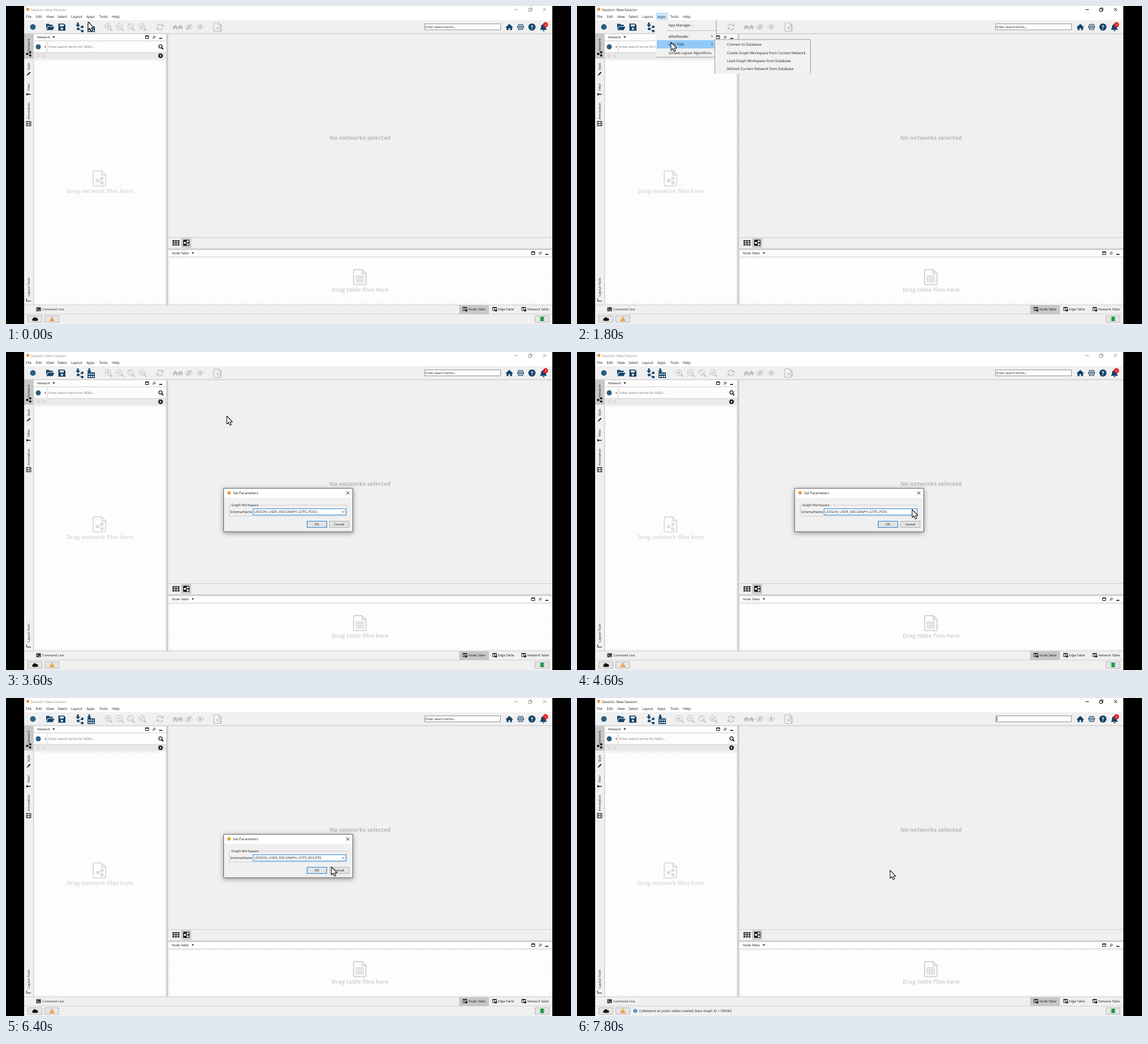
Write an HTML page that moves like this. It is 998 px wide and 561 px high and loops after 8000 ms.

```html
<!DOCTYPE html>
<html lang="en">
<head>
<meta charset="utf-8">
<title>Session</title>
<style>
html, body { margin: 0; height: 100%; overflow: hidden; background: #000; }
svg { display: block; width: 100vw; height: 100vh; }
text { font: 6.25px "Open Sans", "Noto Sans", sans-serif; fill: #1c1c1c; text-rendering: geometricPrecision; white-space: pre; }
.small text, text.small { font-size: 5.65px; }
.mid { text-anchor: middle; }
.big { font-size: 10px; font-weight: 700; text-anchor: middle; }
.pale { fill: #dcdcdc; }
.hint { fill: #777; }
.caption { fill: #8c8c8c; stroke: #999; }
.caption text { stroke: none; fill: inherit; }
.caption.active { fill: #1c1c1c; stroke: #111; }
.line { fill: none; stroke-width: 1; }
.blue { fill: #124368; stroke: #124368; }
.grey { stroke: #bdbdbd; fill: #bdbdbd; }
.blue .line, .grey .line { fill: none; }
.blue, .grey { stroke-width: 0; }
.blue .line, .grey .line { stroke-width: 1.3; }
#dialog { filter: drop-shadow(0 2px 4px #0006); }
</style>
</head>
<body>
<svg viewBox="0 0 998 561" preserveAspectRatio="none">
<defs>
  <g id="lens" class="line"><circle cx="-1" cy="-1" r="5"/><path d="M2.8 2.8L6.5 6.5" style="stroke-width:2"/></g>
  <path id="page" class="line" d="M-9-13H4L11-6V11Q11 13.500 9 13.500H-9Q-11 13.500-11 11V-11Q-11-13-9-13ZM4-13V-6H11" style="stroke-width:2"/>
  <g id="share"><path class="line" d="M4-4L-4 0L4 4" /><circle cx="-4" r="2.400"/><circle cx="4" cy="-4" r="2.400"/><circle cx="4" cy="4" r="2.400"/></g>
  <path id="house" d="M-6.500 .5L0-5.500L6.500 .5L5.800 1.400L4.800 .6V5.500H1.300V2H-1.300V5.500H-4.800V.6L-5.800 1.400Z"/>
  <g id="eye"><path class="line" d="M-6.500 0Q0-8 6.500 0Q0 8-6.500 0Z"/><circle r="2.200"/></g>
  <g id="paneTools">
    <path class="line" stroke="#111" d="M246.500 52.500h5.500v5h-5.500zM246.500 53.300h5.500"/>
    <path class="line" stroke="#333" stroke-width=".8" d="M259 57.800l2-2M259.500 54l3 3M260.500 54.500l1.700-2l2 2l-2 1.700"/>
    <path stroke="#111" stroke-width="1.600" d="M270.500 57.200h5.500"/>
  </g>
  <g id="tableMark"><path d="M-4-3.500h7v6h-7z" fill="none" stroke="#333"/><path d="M-4-2.500h7M-1-3v5" stroke="#333"/><circle cx="2" cy="2" r="2" fill="#222"/></g>
</defs>

<!-- window surfaces -->
<path fill="#f0f0f1" d="M32 0H965V561H32Z"/>
<path fill="#fff" d="M32 0H965V25H32Z"/>
<path fill="#c7c7c7" d="M32 49H48V93H32Z"/>
<path fill="#fdfdfd" d="M48 49H283V82H48ZM48 94H283V527H48ZM287 430H965V527H287Z"/>
<path fill="#e9e9ea" d="M48 82H283V94H48Z"/>
<path fill="#cfcfd0" d="M283 49H286.500V527H283ZM286 427.500H965V430.500H286ZM32 48H965V49.500H32Z"/>
<path class="line" stroke="#cfcfcf" d="M48 61.500H283M48 82H283M72.500 63V81M287 408.500H965M287 442.500H965M32 527.500H965M32 543.500H965M48.500 49V527"/>
<path class="line" stroke="#d4d4d4" stroke-dasharray="2 2" d="M49.500 95.500H281.500V525.500H49.500ZM288.500 444.500H963.500V525.500H288.500Z"/>

<!-- title and menu bar -->
<circle cx="38.500" cy="6" r="2.800" fill="#e89a3c"/>
<g id="caption" class="caption">
  <text x="44" y="8.700">Session: New Session</text>
  <path class="line" d="M898 6.500h6M923 5h4.500v4.500h-4.500zM924.500 5v-1.500h4.500v4.500h-1.500M948.500 3.500l5.500 5.500M954 3.500l-5.500 5.500"/>
</g>
<path id="appsHover" fill="#cce8ff" stroke="#99d1ff" stroke-width=".8" d="M140.500 12.500H160V24H140.500Z"/>
<g><text x="35" y="21">File</text><text x="52.500" y="21">Edit</text><text x="71" y="21">View</text><text x="91" y="21">Select</text><text x="115" y="21">Layout</text><text x="142" y="21">Apps</text><text x="164.500" y="21">Tools</text><text x="187" y="21">Help</text></g>

<!-- toolbar -->
<circle cx="47.500" cy="37" r="5" fill="#2c5f80"/>
<g class="blue">
  <path d="M71 31.500h5l1.500 1.500h5v2.500h-8.500l-3 5zM74.500 36.500h11l-3 6h-11z"/>
  <path fill-rule="evenodd" d="M92.500 31h10l2.500 2.500v10h-12.500zM95 32.500v3.500h7v-3.500zM98.700 38a2 2 0 1 0 .1 0z"/>
  <path d="M125.500 29h3v4h2.500l-4 4.500l-4-4.500h2.500zM145.500 29h3v4h2.500l-4 4.500l-4-4.500h2.500z"/>
  <g transform="translate(131 40.500) scale(.95)"><use href="#share"/></g>
  <path fill-rule="evenodd" d="M144 36h13v10h-13zM145.500 38v2h2.500v-2zM149.200 38v2h2.600v-2zM153 38v2h2.500v-2zM145.500 42v2.500h2.500v-2.500zM149.200 42v2.500h2.600v-2.500zM153 42v2.500h2.500v-2.500z"/>
  <use href="#house" x="889" y="37"/>
  <circle cx="909" cy="37" r="6"/><circle cx="929" cy="37" r="6.300"/>
  <path d="M943 42q2-2 2-5q0-4.500 4.500-5q4 .5 4 5q0 3 2 5zM947.500 42.700h4a2 1.700 0 0 1-4 0z"/>
</g>
<path class="line" stroke="#f0f0f1" stroke-width=".8" d="M903 35h12M903 39h12M909 31v12"/>
<ellipse class="line" stroke="#f0f0f1" cx="909" cy="37" rx="3" ry="6"/>
<text class="mid" x="929" y="40.500" style="font-size:9.500px;font-weight:700;fill:#fff">?</text>
<circle cx="953" cy="33" r="4.500" fill="#e02020"/>
<text class="mid" x="953" y="35" style="font-size:5.500px;fill:#fff">3</text>
<g class="grey">
  <use href="#lens" x="181" y="37"/><use href="#lens" x="201" y="37"/><use href="#lens" x="221" y="37"/><use href="#lens" x="241" y="37"/>
  <path class="line" d="M177.500 36h5M180 33.500v5M197.500 36h5M218 35v-1.500h1.500M222 37v1.500h-1.500M237.500 36l2 2l3-4"/>
  <path class="line" d="M267 35.500q1.500-3.500 5-3.500q3 0 4.500 2.500M277 38.500q-1.500 3.500-5 3.500q-3 0-4.500-2.500"/><path d="M278 31.500v4.500h-4.500zM266 42.500v-4.500h4.500z"/>
  <use href="#house" transform="translate(299 37) scale(.75)"/><use href="#house" transform="translate(308 37) scale(.75)"/>
  <use href="#eye" x="323" y="37"/><path class="line" d="M318 42l10-10"/>
  <use href="#eye" x="343" y="37"/>
  <g transform="translate(373.500 37) scale(.58)"><use href="#page"/></g><g transform="translate(376.500 39) scale(.7)"><use href="#share"/></g>
</g>
<path fill="#fff" stroke="#777" stroke-width=".8" d="M739.500 31.500H873.500V42H739.500Z"/>
<text id="searchHint" class="small" x="741" y="39">Enter search terms...</text>
<path id="caret" stroke="#111" d="M741.700 33v7.500"/>

<!-- side panel -->
<g class="small">
  <text x="55" y="57.200">Network</text><text x="293" y="438.200">Node Table</text>
  <text transform="translate(42 80)rotate(-90)">Network</text>
  <text transform="translate(42 113)rotate(-90)">Style</text>
  <text transform="translate(42 149.500)rotate(-90)">Filter</text>
  <text transform="translate(42 200)rotate(-90)">Annotation</text>
  <text transform="translate(42 512)rotate(-90)">Layout Tools</text>
</g>
<path fill="#222" d="M82 53.500h4.500l-2.200 3zM328 434.500h4l-2 3zM36 154.500v-1l3.500 1.500h4v1.500h-4l-3.500 1.500zM36.500 123.500l1.500-3.500l4-4l1.500 1.500l-4 4z"/>
<g transform="translate(40 84.500) scale(.7)" fill="#111" stroke="#111"><use href="#share"/></g>
<path class="line" stroke="#222" d="M36 203.500h8v8h-8zM38 203.500v8M42 203.500v8M38 207.500h4M36.500 516v4.500h7.500"/>
<use href="#paneTools"/><use href="#paneTools" x="682" y="381"/>
<circle cx="57" cy="72" r="4.500" fill="#2c5f80"/>
<path fill="#222" d="M68 71.500h3l-1.500 2z"/>
<text class="hint" x="75" y="74.200" style="font-size:5.850px">Enter search terms for NDEx...</text>
<g transform="translate(273.500 72) scale(.65)" stroke="#111" style="stroke-width:2"><circle cx="-1" cy="-1" r="4.500" fill="none" stroke-width="2"/><path d="M2.500 2.500L6.500 6.500" stroke-width="3"/></g>
<circle cx="273" cy="87.700" r="2.500" fill="none" stroke="#111" stroke-width="2"/><circle cx="273" cy="87.700" r="3.900" fill="none" stroke="#111" stroke-width="1.200" stroke-dasharray="1.530"/>
<path class="line" stroke="#c2c2c2" d="M54 85l2.500 2l2.500-2M54 88l2.500 2l2.500-2M64 87l2.500-2l2.500 2M64 90l2.500-2l2.500 2"/>
<g class="pale" stroke="#dcdcdc"><use href="#page" x="165" y="304"/><g transform="translate(165.500 308)" stroke-width="1.300"><use href="#share"/></g></g>
<text class="big pale" x="165.500" y="329.500">Drag network files here</text>

<!-- network view and tables -->
<text class="big" x="625.500" y="235.500" style="fill:#bababa">No networks selected</text>
<path fill="#c7c7c7" d="M309.500 409.500H327V426.500H309.500Z"/>
<path fill="#222" d="M294 413h3.500v2.500h-3.500zM298.500 413h3.500v2.500h-3.500zM303 413h3.500v2.500h-3.500zM294 416.500h3.500v2.500h-3.500zM298.500 416.500h3.500v2.500h-3.500zM303 416.500h3.500v2.500h-3.500zM294 420h3.500v2.500h-3.500zM298.500 420h3.500v2.500h-3.500zM303 420h3.500v2.500h-3.500z"/>
<rect x="313" y="412.500" width="11" height="10.500" rx="1.500" fill="#111"/>
<g transform="translate(318.500 417.800) scale(.65)" fill="#fff" stroke="#fff"><use href="#share"/></g>
<g stroke="#d4d4d4"><use href="#page" x="625" y="478"/><path class="line" style="stroke-width:1.300" d="M618.500 476h13v11h-13zM618.500 479.500h13M618.500 483.500h13M623 476v11M627.500 476v11"/></g>
<text class="big" x="625.500" y="504" style="fill:#d4d4d4">Drag table files here</text>

<!-- bottom tabs and status bar -->
<path fill="#c7c7c7" d="M800.500 528H853V543H800.500Z"/>
<rect x="53.500" y="531.500" width="8" height="7" fill="#333"/><path class="line" stroke="#fff" stroke-width=".8" d="M55 533.500l1.500 1.500l-1.500 1.500M57.500 537h2.500"/>
<use href="#tableMark" x="811" y="535"/><use href="#tableMark" x="863.500" y="535"/><use href="#tableMark" x="915" y="535"/>
<g class="small"><text x="64" y="537" style="font-size:5.400px">Command Line</text><text x="817" y="537">Node Table</text><text x="869" y="537">Edge Table</text><text x="921" y="537">Network Table</text></g>
<path fill="#e5e5e5" stroke="#aaa" stroke-width=".8" d="M38.500 546.500H63.500V558H38.500ZM68.500 546.500H93.500V558H68.500ZM934.500 546.500H959V558H934.500Z"/>
<path fill="#111" d="M48 555.500a2.300 2.300 0 0 1 0-4.500a3 3 0 0 1 5.500-.5a2.500 2.500 0 0 1 1 5z"/>
<path fill="#ee9124" d="M81 547.500l4.500 8.500h-9z"/><path stroke="#fff" d="M81 550.500v2.500M81 554v1"/>
<path fill="#159a43" d="M944.500 548h5v8h-5z"/><path class="line" stroke="#159a43" d="M943 549.500h8M943 552h8M943 554.500h8"/>
<g id="message"><circle cx="103" cy="552" r="3.300" fill="#2f86c5"/><path stroke="#fff" d="M103 549.800v1M103 551.500v2.500"/><text x="110" y="554.200" style="font-size:5.800px">CyNetwork w/ public tables created: Base Graph ID = 305683</text></g>

<!-- menus -->
<g id="menu">
  <path fill="#f1f1f1" d="M139.500 25H246V90H139.500Z"/><path class="line" stroke="#9a9a9a" d="M139.500 90.200H246V25"/>
  <path stroke="#c4c4c4" d="M158 43.500H245"/>
  <rect id="menuRow" x="141" width="101.500" height="14.500" fill="#91c9f7"/>
  <text x="161.500" y="36">App Manager...</text><text x="161.500" y="55.500">aMatReader</text><text x="161.500" y="70">VUN TIRA</text><text x="161.500" y="84.500">zDraws Layout Algorithms</text>
  <path class="line" stroke="#333" stroke-width=".8" d="M237.500 51.500l1.700 1.700l-1.700 1.700M237.500 65.700l1.700 1.700l-1.700 1.700"/>
</g>
<g id="submenu">
  <path fill="#f1f1f1" d="M243 59H412.500V119.500H243Z"/><path class="line" stroke="#9a9a9a" d="M243.500 119V59.200H412.500V119"/>
  <rect id="submenuRow" x="244" width="168" height="14" fill="#91c9f7"/>
  <text x="265" y="70">Connect to Database</text><text x="265" y="84.500">Create Graph Workspace from Current Network</text><text x="265" y="99">Load Graph Workspace from Database</text><text x="265" y="113.300">Refresh Current Network from Database</text>
</g>

<!-- dialog -->
<g id="dialog">
  <path fill="#f0f0f0" stroke="#666" d="M384.500 240.500H612.500V317H384.500Z"/><path fill="#fff" d="M385 241H612V257.500H385Z"/>
  <circle cx="394" cy="248.500" r="3" fill="#e89a3c"/><text x="401" y="251">Set Parameters</text>
  <path class="line" stroke="#222" d="M601 246l5.500 5.500M606.500 246l-5.500 5.500"/>
  <path class="line" stroke="#d0d0d0" d="M397 270H394.500V289.500H602V270H447"/>
  <text x="398" y="272" style="font-size:5.800px">Graph Workspace</text><text class="small" x="396" y="284">Schema/Name</text>
  <path fill="#fff" stroke="#2a86d8" d="M436.500 276.500H600.500V287.500H436.500Z"/>
  <path id="comboButton" fill="#cce4f7" stroke="#2a86d8" d="M591 276.500H600.500V287.500H591Z"/>
  <path class="line" stroke="#333" d="M593.500 281l2 2l2-2"/>
  <text id="choice" x="438.500" y="284.200" style="font-size:6.150px"></text>
  <path id="okButton" fill="#e3e3e3" stroke="#2a86d8" stroke-width="1.200" d="M532 298.500H566.500V309.500H532Z"/>
  <path id="okFocus" class="line" stroke="#333" stroke-width=".7" stroke-dasharray="1" d="M533.700 300.200H565V308H533.700Z"/>
  <path fill="#e3e3e3" stroke="#b0b0b0" d="M571.500 298.500H606V309.500H571.500Z"/>
  <text class="mid" x="549" y="306.200" style="font-size:5.800px">OK</text><text class="mid" x="588.500" y="306.200" style="font-size:5.800px">Cancel</text>
</g>
<g id="list"><path fill="#fff" stroke="#555" stroke-width=".8" d="M436.500 288H600.500V319.300H436.500Z"/><rect id="listRow" x="437" width="163" height="7.900" fill="#0078d7"/></g>

<path id="cursor" fill="#fff" stroke="#111" stroke-width="1.100" stroke-linejoin="round" d="M0 0V14L3.200 11.200L5.500 16.200L8 15L5.800 10.300H10.200Z"/>
</svg>
<script>
const LOOP = 8000, STEP = 200;
const $ = id => document.getElementById(id);
const show = (id, on) => $(id).style.display = on ? "" : "none";
const within = (t, from, to) => t >= from && t < to;

// time, x, y of the pointer tip
const route = [
  [0, 145, 28], [400, 148, 18], [1200, 148, 18], [1600, 164, 61], [1800, 166, 64],
  [2200, 262, 69], [2600, 299, 82], [2800, 303, 88], [3200, 312, 97], [3400, 350, 105],
  [3600, 390, 113], [3800, 396, 122], [4600, 592, 278], [5000, 592, 278], [5600, 582, 296],
  [6200, 582, 296], [7000, 553, 304], [LOOP, 553, 304]
];
function pointerAt(t) {
  const i = route.findIndex(p => p[0] > t);
  const [t0, x0, y0] = route[i - 1], [t1, x1, y1] = route[i];
  const k = (t - t0) / (t1 - t0);
  return [x0 + (x1 - x0) * k, y0 + (y1 - y0) * k];
}

const schema = "LESSON_USER_000.";
const graphs = ["GRAPH_GTFS_POIS", "GRAPH_GTFS_ROUTES", "GRAPH_GTFS_ROUTES_STARTER", "NCI_GRAPH"];
const listTop = 288, listPitch = 7.8;
const entries = graphs.map((name, i) => {
  const entry = document.createElementNS($("list").namespaceURI, "text");
  entry.setAttribute("x", 437.5);
  entry.setAttribute("y", listTop + listPitch * i + 6);
  entry.style.fontSize = "6.15px";
  entry.textContent = schema + name;
  return $("list").appendChild(entry);
});

function render(now) {
  const t = Math.floor(now % LOOP / STEP) * STEP;
  const [x, y] = pointerAt(t);
  const dialog = within(t, 3600, 7600), listOpen = within(t, 4800, 6200);
  const subRow = Math.floor((y - 60.3) / 14.4);
  const listRow = Math.max(0, Math.floor((y - listTop) / listPitch));

  $("cursor").setAttribute("transform", `translate(${x} ${y})`);
  $("caption").classList.toggle("active", within(t, 800, 3600) || t >= 7600);
  show("appsHover", within(t, 400, 3400));
  show("menu", within(t, 800, 3400));
  show("menuRow", y >= 46);
  $("menuRow").setAttribute("y", y < 60 ? 46 : 60.3);
  show("submenu", within(t, 1600, 3400));
  show("submenuRow", x > 243);
  $("submenuRow").setAttribute("y", 60.5 + 14.4 * subRow);

  show("dialog", dialog);
  show("list", listOpen);
  show("comboButton", listOpen);
  $("choice").textContent = schema + graphs[t < 6200 ? 0 : 1] + (t < 4200 ? "|" : "");
  $("listRow").setAttribute("y", listTop + listPitch * listRow);
  entries.forEach((entry, i) => entry.style.fill = i === listRow ? "#fff" : "");
  show("okFocus", t >= 7400);
  $("okButton").style.fill = t >= 7400 ? "#cce4f7" : "";

  show("searchHint", t < 7600);
  show("caret", t >= 7600);
  show("message", t >= 7800);
}

const start = performance.now();
function tick() {
  render(performance.now() - start);
  requestAnimationFrame(tick);
}
tick();
</script>
</body>
</html>
```
